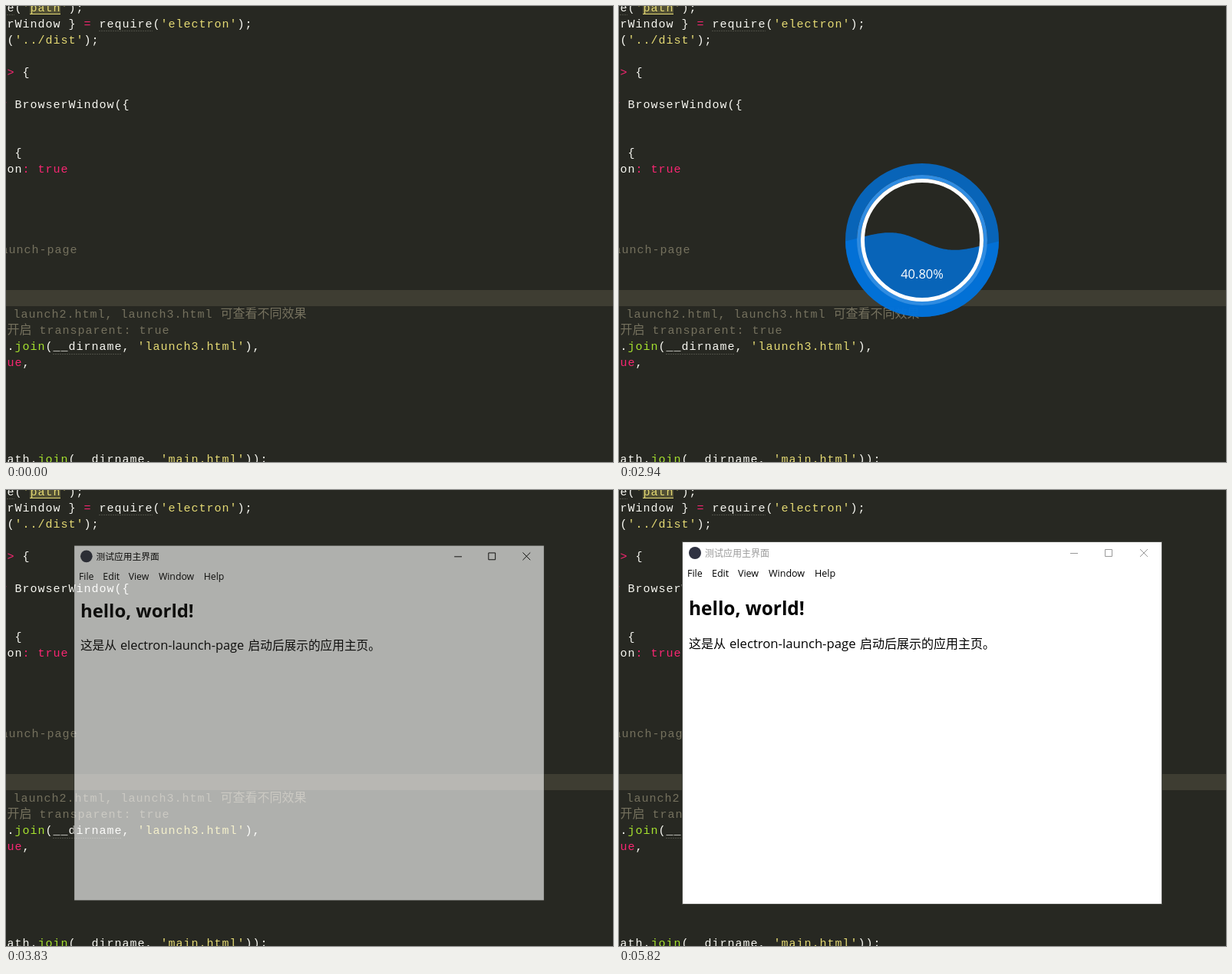
Recreate the animation shown at these times as an HTML page. Size 791 by 594 pixels, loop 5.87 s.

```html
<!DOCTYPE html>
<html lang="zh-CN">
<head>
<meta charset="utf-8">
<style>
  html, body { margin: 0; width: 100%; height: 100%; overflow: hidden; background: #272822; }
  svg { display: block; }
  text { white-space: pre; font-family: "Open Sans", "Noto Sans CJK SC", "Noto Sans CJK", sans-serif; }
  /* 9px glyphs set wide on a 10px grid */
  #code text {
    font: 15px "Liberation Mono", "Noto Sans CJK SC", "Noto Sans CJK", monospace;
    letter-spacing: 1px;
    fill: #f8f8f2;
  }
  #code .cjk { font-size: 16px; letter-spacing: 0; }
  #code .p { fill: #f92672; }
  #code .s { fill: #e6db74; }
  #code .g { fill: #a6e22e; }
  #code .c { fill: #75715e; }
  .dash { stroke: #4d4e45; stroke-dasharray: 2 1; }
</style>
</head>
<body>
<svg width="791" height="594" viewBox="0 0 791 594">
  <g id="code">
    <rect y="370" width="791" height="21" fill="#3e3d32"/>
    <rect x="31" width="40" height="10" fill="#e6db74" opacity=".22"/>
    <path d="M31 10.5H71" stroke="#e6db74"/>
    <path class="dash" d="M1 11.5H11M121 32.5H191M61 453.5H151"/>
  </g>

  <g id="ring">
    <clipPath id="disc"><circle cx="395" cy="305" r="100"/></clipPath>
    <path id="wave" clip-path="url(#disc)" fill="#0074de" fill-opacity=".8"/>
    <g fill="none">
      <circle cx="395" cy="305" r="92.5" stroke="#0074de" stroke-opacity=".8" stroke-width="15"/>
      <circle cx="395" cy="305" r="82.5" stroke="#2f8ce2" stroke-width="5"/>
      <circle cx="395" cy="305" r="77.5" stroke="#fff" stroke-width="5"/>
    </g>
    <text id="percent" x="395" y="355" font-size="16.5" text-anchor="middle" fill="#fff"></text>
  </g>

  <g id="win">
    <rect id="frame" x="82.5" y="67.5" width="625" height="472" fill="none"/>
    <rect x="83" y="68" width="624" height="471" fill="#fff"/>
    <circle cx="99" cy="82" r="8" fill="#2f3241"/>
    <g id="bar">
      <text x="112" y="87" font-size="12">测试应用主界面</text>
      <path d="M588 82.5H598M633.5 77.5h9v9h-9zM679 77l10 10M689 77l-10 10" fill="none" stroke="currentColor"/>
    </g>
    <g font-size="12.5">
      <text x="89" y="113">File</text>
      <text x="121" y="113">Edit</text>
      <text x="155" y="113">View</text>
      <text x="195" y="113">Window</text>
      <text x="255" y="113">Help</text>
    </g>
    <text x="91" y="163" font-size="24.4" font-weight="700">hello, world!</text>
    <g font-size="16">
      <text x="91" y="206">这是从</text>
      <text x="144" y="206" font-size="16.7">electron-launch-page</text>
      <text x="314" y="206">启动后展示的应用主页。</text>
    </g>
  </g>
</svg>
<script>
const LOOP = 5870;
const $ = id => document.getElementById(id);

// Each line: x, baseline, then alternating class and text.
const lines = [
  [1, 7, '', "e(", 's', "'path'", '', ");"],
  [1, 28, '', "rWindow } ", 'p', "=", '', " require(", 's', "'electron'", '', ");"],
  [1, 49, '', "(", 's', "'../dist'", '', ");"],
  [-9, 91, 'p', "=>", '', " {"],
  [-9, 133, 'p', "w", '', " BrowserWindow({"],
  [11, 196, '', "{"],
  [1, 217, '', "on", 'p', ": true"],
  [-7, 322, 'c', "aunch-page"],
  [9, 406, 'c', "launch2.html, launch3.html ", 'c cjk', "可查看不同效果"],
  [1, 427, 'c cjk', "开启", 'c', " transparent: true"],
  [-9, 448, '', "h.", 'g', "join", '', "(__dirname, ", 's', "'launch3.html'", '', "),"],
  [1, 469, 'p', "ue", '', ","],
  [-9, 595, '', "path.", 'g', "join", '', "(__dirname, ", 's', "'main.html'", '', "));"]
];

function svg(tag, attrs, parent) {
  const el = document.createElementNS('http://www.w3.org/2000/svg', tag);
  for (const key in attrs) el.setAttribute(key, attrs[key]);
  return parent.appendChild(el);
}

for (const [x, y, ...parts] of lines) {
  const line = svg('text', { x: x + 0.5, y }, $('code'));
  for (let i = 0; i < parts.length; i += 2)
    svg('tspan', { class: parts[i] }, line).textContent = parts[i + 1];
}

// The system's fade and zoom for opening and closing windows.
function show(id, alpha, cx, cy) {
  const el = $(id), scale = 1 - 0.053 * (1 - alpha);
  el.setAttribute('opacity', alpha);
  el.setAttribute('transform',
    `translate(${cx} ${cy}) scale(${scale}) translate(${-cx} ${-cy})`);
}

const stepAt = (levels, age) =>
  age < 0 ? 0 : levels[Math.min(Math.floor(age / 60), levels.length - 1)];

function quantize(t) {
  const start = t < 2340 ? 1810 : t < 2400 ? 2340 : t < 3590 ? 2400 : 3590;
  return start + Math.floor((t - start) / 60) * 60;
}

function drawWave(age) {
  const amp = 20.6 - 0.0085 * age, skew = 0.0013 * age;
  let d = 'M295 405';
  for (let x = 0; x <= 200; x += 2) {
    const a = x / 100 * Math.PI;
    d += `L${295 + x} ${(306.5 - amp * Math.sin(a) + skew * Math.sin(2 * a)).toFixed(2)}`;
  }
  $('wave').setAttribute('d', d + 'L495 405Z');
}

function render(t) {
  const ringAlpha = t < 3590
    ? stepAt([0.45, 0.77, 0.92, 0.98, 1], t - 1810)
    : stepAt([0.6, 0.15, 0], t - 3590);
  show('ring', ringAlpha, 395, 305);
  if (ringAlpha) {
    const age = quantize(t) - 1810;
    drawWave(age);
    $('percent').textContent = (4.72 + age * 36.08 / 1130).toFixed(2) + '%';
  }

  show('win', stepAt([0.2, 0.63, 0.87, 0.97, 1], t - 3770), 395, 303.5);
  const active = t < 5820;
  $('bar').setAttribute('fill', active ? '#000' : '#999');
  $('bar').setAttribute('color', active ? '#000' : '#999');
  $('frame').setAttribute('stroke', active ? '#30312b' : '#4a4b46');
}

let begin;
function tick(now) {
  begin ??= now;
  render((now - begin) % LOOP);
  requestAnimationFrame(tick);
}
render(0);
requestAnimationFrame(tick);
</script>
</body>
</html>
```
